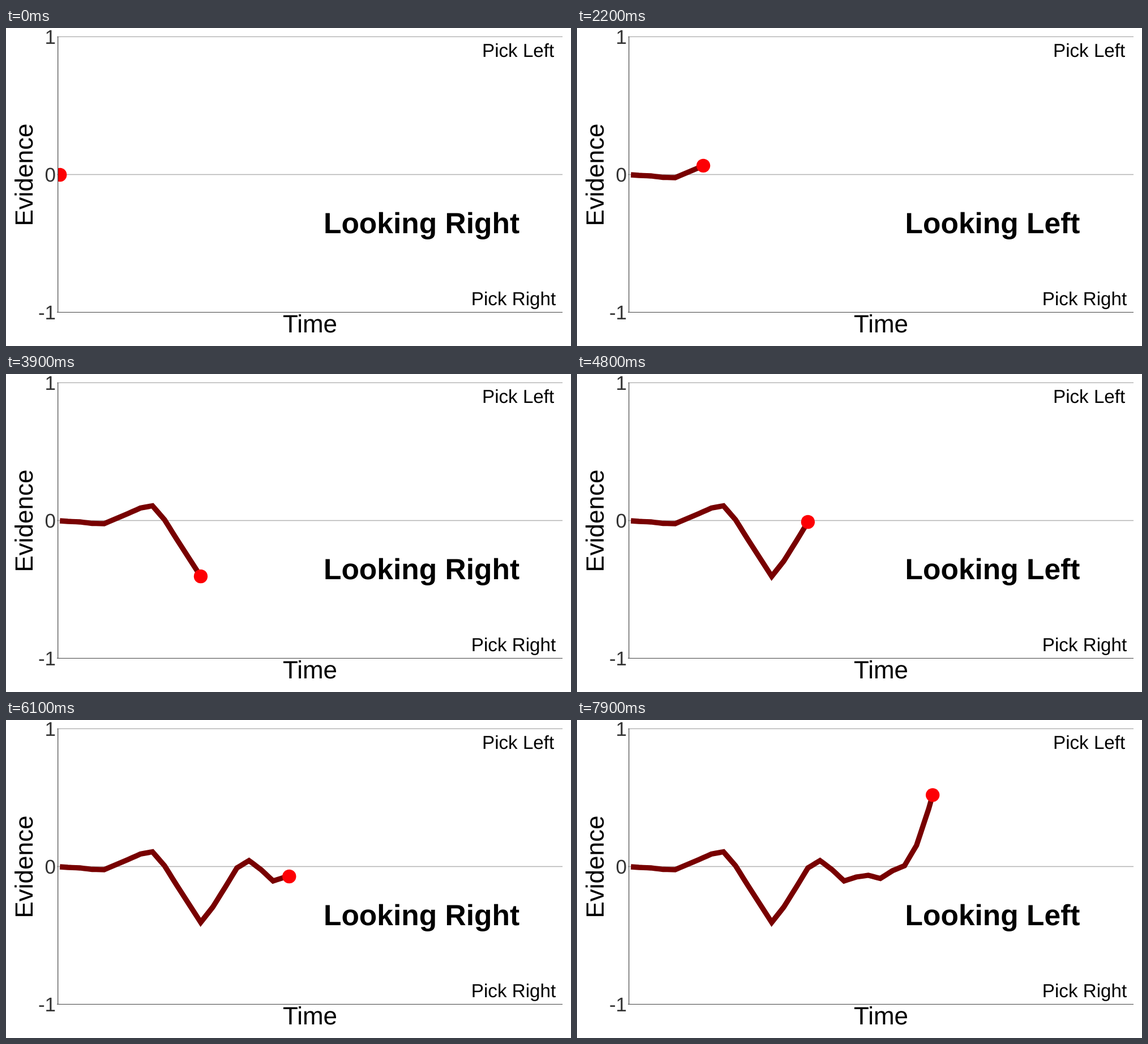
An HTML page for the animation above (8 s loop, 998 px wide and 561 px high).

```html
<!DOCTYPE html>
<html lang="en">
<head>
<meta charset="utf-8">
<title>Evidence accumulation</title>
<style>
  html, body { margin: 0; width: 100%; height: 100%; overflow: hidden; background: #fff; }
  svg { display: block; width: 100%; height: 100%; }
  text { font-family: "Liberation Sans", Arial, sans-serif; text-rendering: geometricPrecision; }
  .tick { font-size: 35px; fill: #333; text-anchor: end; }
  .axis { font-size: 44px; text-anchor: middle; }
  .choice { font-size: 33.2px; }
  #gaze { font-size: 51.5px; font-weight: bold; text-anchor: middle; }
</style>
</head>
<body>
<svg viewBox="0 0 998 561">
  <clipPath id="plot"><rect x="92" y="15" width="891" height="487"/></clipPath>

  <path d="M90 15.4H983" stroke="#999"/>
  <path d="M90 258.5H983" stroke="#b3b3b3" stroke-width="1.5"/>
  <path d="M90 501.5H983" stroke="#444"/>

  <g clip-path="url(#plot)">
    <polyline id="trail" fill="none" stroke="#780000" stroke-width="9.3"/>
    <circle id="dot" r="12.2" fill="#fd0004"/>
  </g>
  <path d="M91.7 15V502" stroke="#444" stroke-width="1.2"/>

  <text class="tick" x="88" y="28">1</text>
  <text class="tick" x="88" y="271">0</text>
  <text class="tick" x="88" y="514">-1</text>
  <text class="axis" x="537" y="537">Time</text>
  <text class="axis" transform="translate(46.7 259) rotate(-90)">Evidence</text>
  <text class="choice" x="841" y="51.2">Pick Left</text>
  <text class="choice" x="821.8" y="489.2">Pick Right</text>
  <text id="gaze" x="734" y="362.3"></text>
</svg>
<script>
  const LOOP = 8000, HOLD = 500, STEP = 100;
  const GAZE_STEPS = 12, LAST_GAZE = 5;
  const KEY_STEPS = 3;

  // Evenly spaced heights of the path, four to a gaze; straight runs in between.
  const keys = [
    258.5, 260, 261, 263.5, 264, 255, 246, 236.5, 232.5,
    257, 291, 324, 357, 330, 296, 261, 248,
    264, 284, 277, 274, 279.5, 266, 257, 221, 157, 83
  ];

  const stepAt = t => t < HOLD ? 0 : Math.floor((t - HOLD) / STEP) + 1;

  function pointAt(step) {
    const u = (step + 1) / KEY_STEPS, i = Math.floor(u);
    return [95.2 + 7.107 * step, keys[i] + (keys[i + 1] - keys[i]) * (u - i)];
  }

  const trail = document.getElementById("trail");
  const dot = document.getElementById("dot");
  const gaze = document.getElementById("gaze");

  function draw(time) {
    const step = stepAt(time % LOOP);
    const path = Array.from({ length: step + 1 }, (_, i) => pointAt(i));
    const [x, y] = path[step];
    const looksLeft = Math.min(Math.floor(step / GAZE_STEPS), LAST_GAZE) % 2;

    trail.setAttribute("points", path.join(" "));
    dot.setAttribute("cx", x);
    dot.setAttribute("cy", y);
    gaze.textContent = looksLeft ? "Looking Left" : "Looking Right";
  }

  const start = performance.now();
  function tick() {
    draw(performance.now() - start);
    requestAnimationFrame(tick);
  }
  tick();
</script>
</body>
</html>
```
